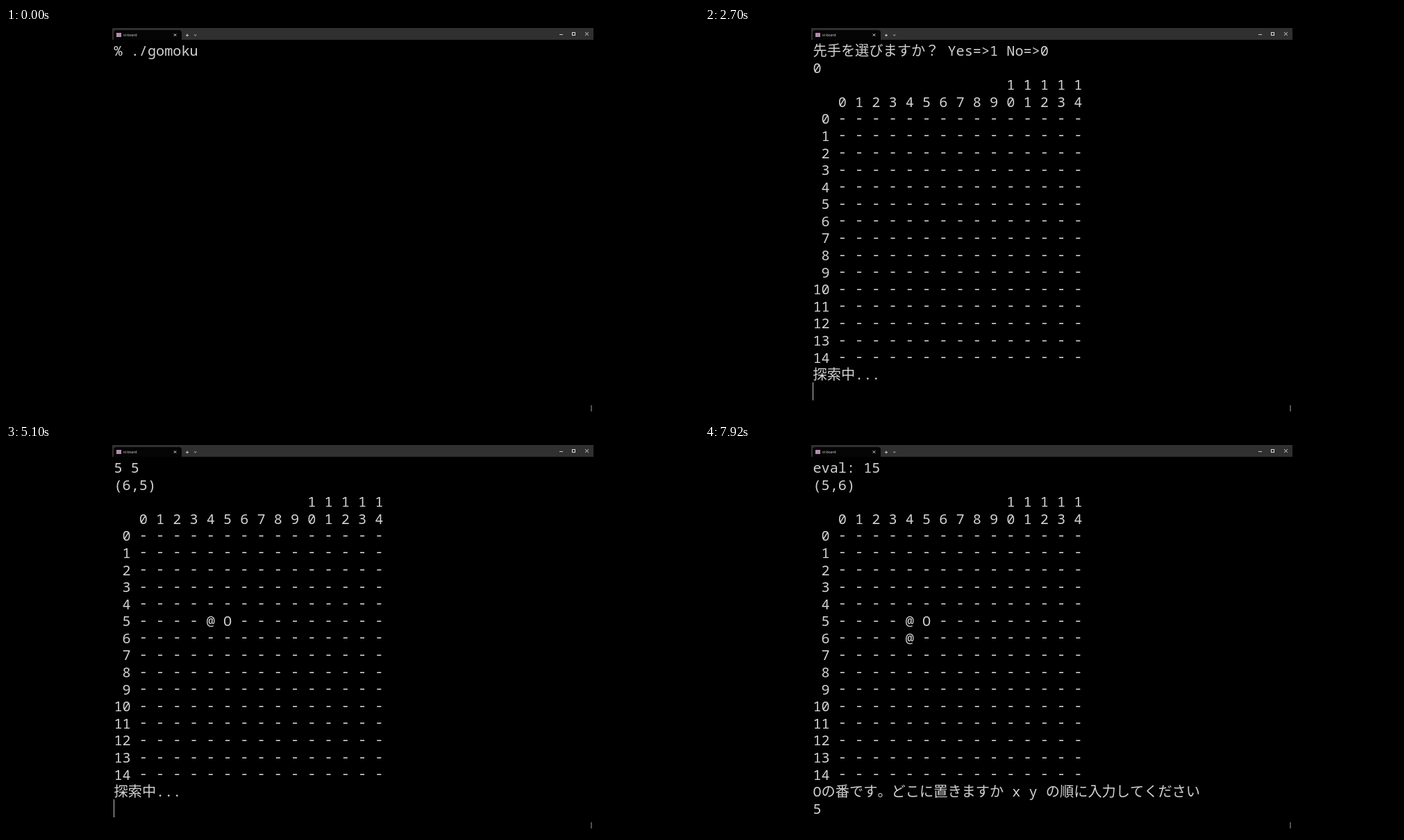
Write an HTML page with a canvas that moves like this. It is 998x561 px and loops after 8 s.

```html
<!DOCTYPE html>
<html lang="ja">
<head>
<meta charset="utf-8">
<title>Gomoku in a terminal</title>
<style>
html, body { margin: 0; width: 100%; height: 100%; overflow: hidden; background: #000; }
canvas { display: block; }
</style>
</head>
<body>
<canvas id="stage" width="998" height="561"></canvas>
<script>
const ctx = document.getElementById('stage').getContext('2d');
const LOOP = 8000, LEFT = 155.5, CELL = 12.12, WIDE = 20.2, ROW = 24.59, BASE = 40, ROWS = 21;
const FONT = '20.2px "Noto Sans Mono", "Noto Sans CJK JP", "Noto Sans CJK", monospace';
const ASK = 'Oの番です。どこに置きますか x y の順に入力してください';
const SEARCH = '探索中...';

// Fifteen by fifteen board; stones are keyed by "column,row".
function board(stones) {
  const cols = [...Array(15).keys()];
  return [
    ' '.repeat(23) + '1 1 1 1 1',
    '   ' + cols.map(c => c % 10).join(' '),
    ...cols.map(r => String(r).padStart(2) + ' ' +
      cols.map(c => stones[c + ',' + r] || '-').join(' '))
  ];
}

// Output appends lines; a key extends the last line.
const events = [
  { at: 0, key: '% ./gomoku' },
  { at: 1800, out: ['先手を選びますか？ Yes=>1 No=>0', ''] },
  { at: 2100, key: '0' },
  { at: 2350, out: [...board({}), SEARCH, ''] },
  { at: 3000, out: ['eval: 10', '(5,5)', ...board({ '4,5': '@' }), ASK, ''] },
  { at: 4200, key: '5' },
  { at: 4400, key: ' ' },
  { at: 4600, key: '5' },
  { at: 4850, out: ['(6,5)', ...board({ '4,5': '@', '5,5': 'O' }), SEARCH, ''] },
  { at: 5500, out: ['eval: 15', '(5,6)', ...board({ '4,5': '@', '5,5': 'O', '4,6': '@' }), ASK, ''] },
  { at: 7390, key: '5' }
];
const cursorOff = [[0, 970], [1500, 1800], [3900, 4200], [6320, 6620], [7900, 8000]];

function screenAt(t) {
  const log = [''];
  for (const e of events) {
    if (e.at > t) break;
    if (e.out) log.push(...e.out);
    else log[log.length - 1] += e.key;
  }
  return log.slice(-ROWS);
}

function rect(color, x, y, w, h) {
  ctx.fillStyle = color;
  ctx.fillRect(x, y, w, h);
}

function strokes(color, ...lines) {
  ctx.strokeStyle = color;
  ctx.lineWidth = 1;
  ctx.beginPath();
  for (const [x1, y1, x2, y2] of lines) {
    ctx.moveTo(x1, y1);
    ctx.lineTo(x2, y2);
  }
  ctx.stroke();
}

function cross(x, y, r) {
  strokes('#ddd', [x - r, y - r, x + r, y + r], [x + r, y - r, x - r, y + r]);
}

function titleBar() {
  rect('#303030', 153, 0, 693, 17);
  ctx.fillStyle = '#050505';
  ctx.beginPath();
  ctx.roundRect(155, 3, 98, 14, [4, 4, 0, 0]);
  ctx.fill();
  rect('#b58bb0', 159, 7, 7, 6);
  ctx.fillStyle = '#e0e0e0';
  ctx.font = '5px "Open Sans", sans-serif';
  ctx.fillText('st-board', 169, 12);
  cross(243.5, 10, 1.7);
  strokes('#ccc', [259, 10.5, 263, 10.5], [261, 8.5, 261, 12.5],
    [271, 9.5, 272.7, 11], [272.7, 11, 274.4, 9.5], [797, 9.5, 802, 9.5]);
  ctx.strokeStyle = '#ddd';
  ctx.strokeRect(815.5, 6.5, 4, 4);
  cross(836.5, 8.5, 2.3);
}

function drawLine(text, row) {
  let x = LEFT;
  const y = BASE + row * ROW;
  for (const ch of text) {
    ctx.fillText(ch, x, ch === '-' ? y - 1.5 : y);
    x += ch.charCodeAt(0) > 255 ? WIDE : CELL;
  }
  return x;
}

function draw(t) {
  rect('#000', 0, 0, 998, 561);
  titleBar();
  ctx.font = FONT;
  ctx.fillStyle = '#d2d2d2';
  const lines = screenAt(t);
  let end = LEFT;
  lines.forEach((text, row) => { end = drawLine(text, row); });
  if (!cursorOff.some(([a, b]) => t >= a && t < b))
    rect('#c4c4c4', Math.floor(end), Math.round(19.5 + (lines.length - 1) * ROW), 1, 26);
  rect('#a0a0a0', 842.5, 544, 1, 9);
}

const start = performance.now();
function tick() {
  draw((performance.now() - start) % LOOP);
  requestAnimationFrame(tick);
}
tick();
</script>
</body>
</html>
```
